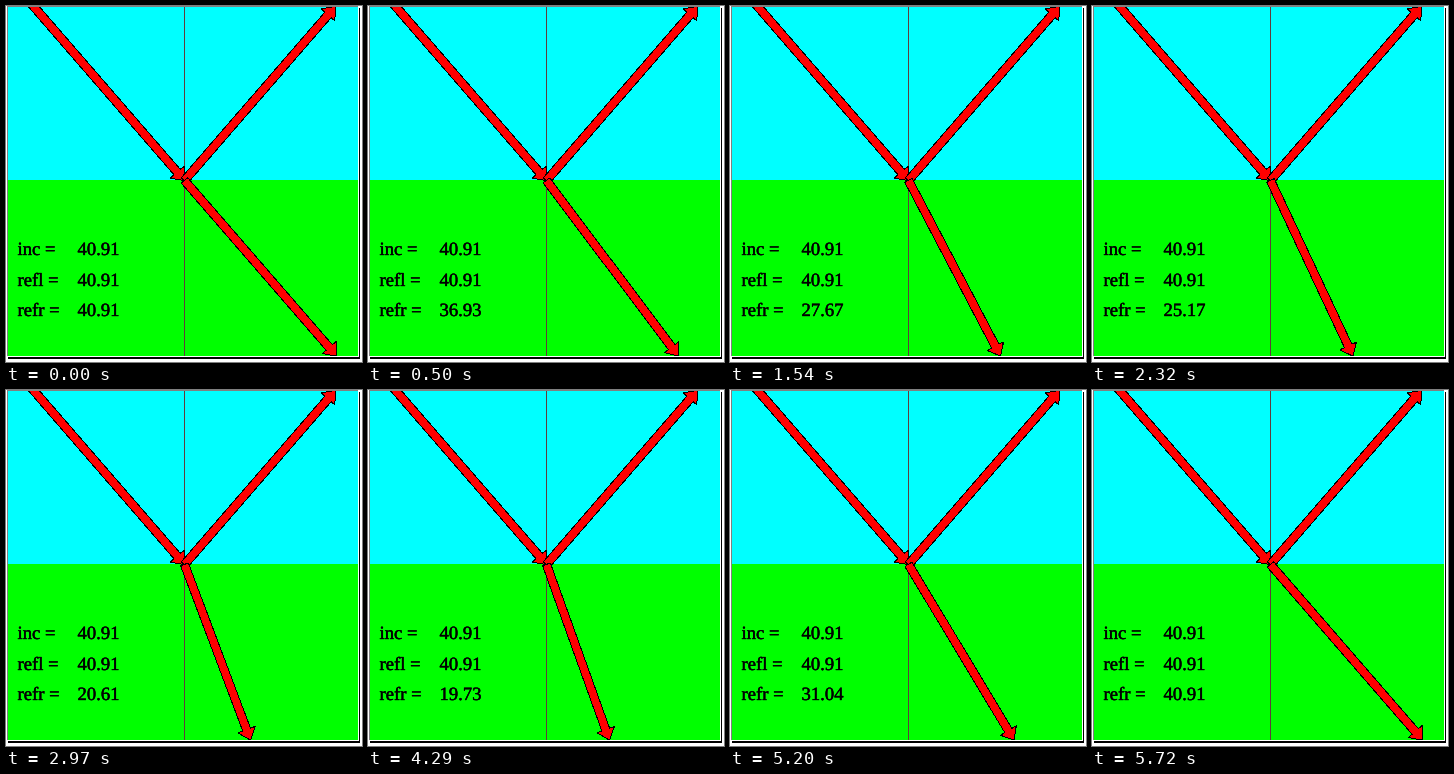
These frames come from a looping animation (356 by 356 pixels, 8 s). A matplotlib script:

```python
import numpy as np
import matplotlib.pyplot as plt
from matplotlib.animation import FuncAnimation
from matplotlib.patches import Polygon, Rectangle
from matplotlib.patheffects import withStroke

SIZE, DPI = 356, 100
PX = 72 / DPI            # points per pixel
LOOP, TICK = 8000, 10    # ms
INC = 40.91              # angle of incidence, degrees
HIT = np.array([178.5, 174.5])
GREY = "#808080"

# Moments at which the refractive index is updated
STEPS = np.r_[0, 500, np.arange(760, 3361, 130), np.arange(4290, 5721, 130)]
KEY_T = [0, 500, 1020, 1540, 2450, 2970, 3360, 4290, 5070, 5200, 5720]
KEY_N = [1, 1.09, 1.24, 1.41, 1.56, 1.86, 2, 1.94, 1.30, 1.27, 1]
INDEX = np.round(np.interp(STEPS, KEY_T, KEY_N), 2)

fig = plt.figure(figsize=(SIZE / DPI, SIZE / DPI), dpi=DPI, facecolor="white")
ax = fig.add_axes([0, 0, 1, 1])
ax.set(xlim=(0, SIZE), ylim=(SIZE, 0))
ax.axis("off")


def box(x, y, w, h, color):
    return ax.add_patch(Rectangle((x, y), w, h, fc=color, lw=0, antialiased=False))


def arrow_points(start, end, inset=0, half=4, wing=9, head=11):
    """Arrow outline, shrunk on every side by inset."""
    d = (end - start) / np.hypot(*(end - start))
    n = np.array([d[1], -d[0]])
    neck = end - (head - inset) * d
    tip = end - inset * np.hypot(wing, head) / wing * d
    tail = start + inset * d
    side = wing / head * np.hypot(*(tip - neck)) * n
    edge = (half - inset) * n
    return np.array([tail + edge, neck + edge, neck + side, tip,
                     neck - side, neck - edge, tail - edge])


class Arrow:
    """Red arrow laid over a black one that is a pixel larger all round."""

    def __init__(self, start, end):
        self.layers = []
        for color in ("black", "red"):
            p = Polygon(np.zeros((3, 2)), fc=color, lw=0, antialiased=False)
            ax.add_patch(p)
            p.set_clip_path(stage)
            self.layers.append(p)
        self.place(start, end)

    def place(self, start, end):
        for inset, p in enumerate(self.layers):
            p.set_xy(arrow_points(start, end, inset))


def label(x, y, text):
    return ax.text(x, y, text, family="Liberation Serif", size=18.67 * PX,
                   va="baseline",
                   path_effects=[withStroke(linewidth=0.4 * PX, foreground="black")])


def ray_end(angle, dy):
    return HIT + [abs(dy) * np.tan(np.radians(angle)), dy]


# Frame, the two media and the normal
box(2, 2, 352, 351, "black")
box(1, 0, 352, 351, "white")
box(1, 0, 351, 350, GREY)
stage = box(2, 1, 350, 349, "lime")
box(2, 1, 350, 173, "cyan")
box(178, 1, 1, 349, "#603c3c")

top = ray_end(INC, -174)
Arrow(HIT + (HIT - top) * [1.05, -1.05], HIT)
Arrow(HIT, top)
refracted = Arrow(HIT, ray_end(INC, 175.5))

values = []
for name, y in (("inc", 249), ("refl", 280), ("refr", 310)):
    label(11.5, y, f"{name} =")
    values.append(label(71.5, y, f"{INC:.2f}"))


def update(i):
    n = INDEX[np.searchsorted(STEPS, i * TICK, side="right") - 1]
    angle = np.degrees(np.arcsin(np.sin(np.radians(INC)) / n))
    refracted.place(HIT, ray_end(angle, 175.5))
    values[2].set_text(f"{angle:.2f}")
    return *refracted.layers, values[2]


anim = FuncAnimation(fig, update, frames=LOOP // TICK, interval=TICK,
                     repeat=True, repeat_delay=0, blit=False)
plt.show()
```
